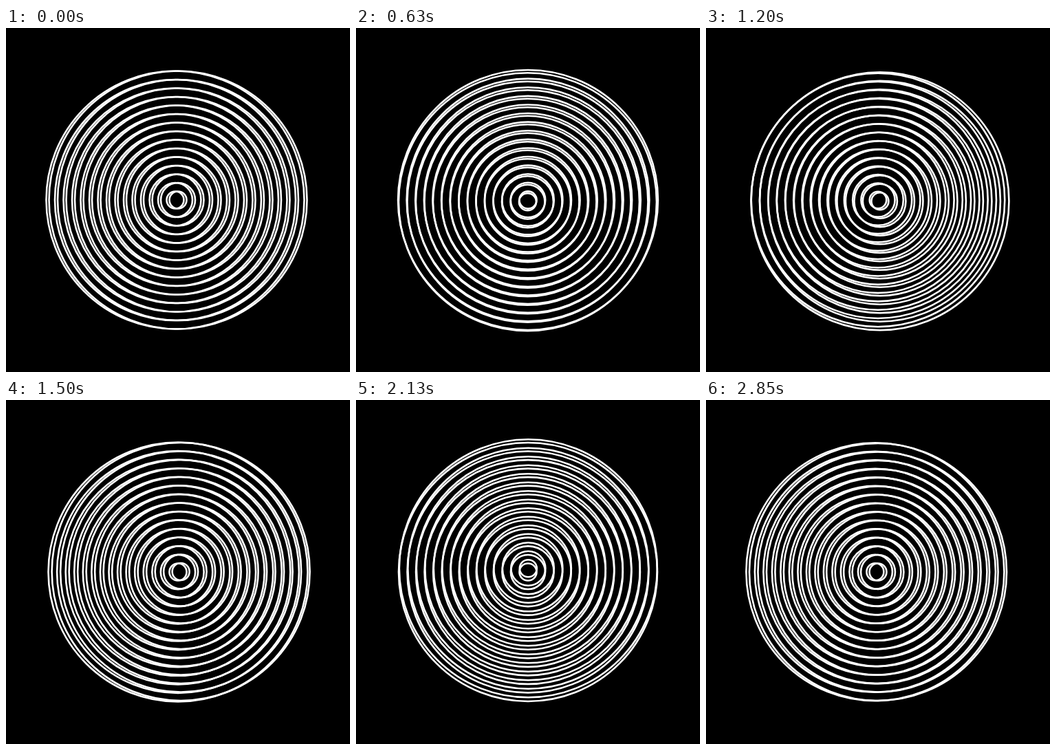
Recreate the animation shown at these times as an HTML page with a canvas. Size 500 by 500 pixels, loop 2880 ms.

```html
<!DOCTYPE html>
<html lang="en">
<head>
<meta charset="utf-8">
<title>Concentric rings</title>
<style>
  html, body { margin: 0; height: 100%; overflow: hidden; background: #000; }
  canvas { display: block; }
</style>
</head>
<body>
<canvas id="stage" width="500" height="500"></canvas>
<script>
const ctx = document.getElementById('stage').getContext('2d');
const LOOP = 2880, STEP = 30;
const CENTER = 250, RINGS = 15, SPACING = 12.5;
const ORBIT = 4, SWELL = 1.25, PULSE = 0.02;

function drawRings(x, y, scale) {
  for (let i = 1; i <= RINGS; i++) {
    ctx.beginPath();
    ctx.arc(x, y, i * SPACING * scale, 0, 2 * Math.PI);
    ctx.stroke();
  }
}

function draw(now) {
  const time = Math.floor((now % LOOP) / STEP) * STEP;
  const angle = 2 * Math.PI * time / LOOP;

  ctx.fillStyle = '#000';
  ctx.fillRect(0, 0, 500, 500);
  ctx.strokeStyle = '#fff';
  ctx.lineWidth = 2.6;

  // One set breathes in place, the other circles counter-clockwise,
  // swinging wider through the upper half.
  const reach = ORBIT - SWELL * Math.sin(angle);
  drawRings(CENTER, CENTER, 1 + PULSE * Math.sin(2 * angle));
  drawRings(CENTER - reach * Math.cos(angle), CENTER + reach * Math.sin(angle), 1);
}

const start = performance.now();
function tick() {
  draw(performance.now() - start);
  requestAnimationFrame(tick);
}
tick();
</script>
</body>
</html>
```
